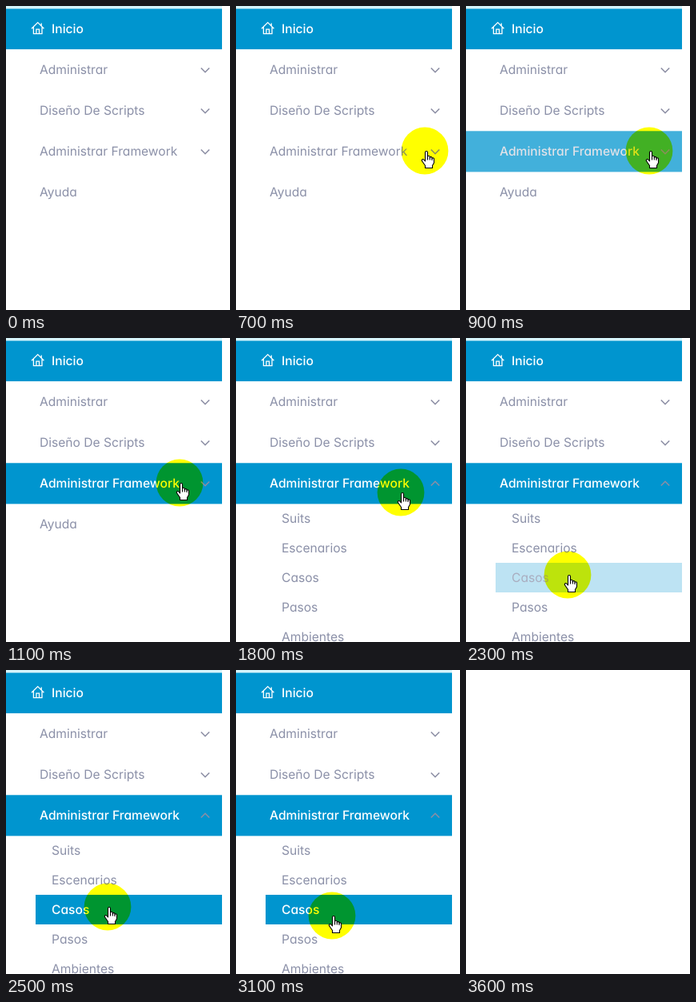
Animation, 280 px wide and 380 px high, one loop 3.7 s. Source, as an HTML page:

```html
<!DOCTYPE html>
<html lang="es">
<head>
<meta charset="utf-8">
<title>Menú lateral</title>
<style>
  html, body { margin: 0; width: 100%; height: 100%; overflow: hidden; background: #fff; }
  svg { display: block; }
  text {
    font-family: Inter, "Open Sans", sans-serif;
    font-size: 15.6px;
    font-feature-settings: "cv11";
    text-rendering: geometricPrecision;
  }
  .line { fill: none; stroke: #8c8ea4; stroke-width: 1.6; }
  /* Inverting the blue channel turns white to yellow and the menu blue to green. */
  .spot { fill: #00f; mix-blend-mode: difference; }
</style>
</head>
<body>
<script>
const LOOP = 3700, STEP = 100, END = 3600, POINTER_IN = 700;
const WIDTH = 270, STRIP = 3.5, MENU_TOP = 3, MENU_ROW = 51.1, SUB_ROW = 37, SUB_TOP = 207;
const BLUE = "rgb(0,149,207)", GREY = [139, 144, 168];

function el(parent, tag, attrs = {}, content = "") {
  const node = document.createElementNS("http://www.w3.org/2000/svg", tag);
  for (const key in attrs) node.setAttribute(key, attrs[key]);
  node.textContent = content;
  return parent.appendChild(node);
}

// Smooth rise from 0 to 1 between two times.
function ramp(t, from, to) {
  const p = Math.min(1, Math.max(0, (t - from) / (to - from)));
  return p * p * (3 - 2 * p);
}

function makeRow(parent, x, y, height, textX, label) {
  const back = el(parent, "rect", { x, y, width: WIDTH - x, height, fill: BLUE });
  const text = el(parent, "text", { x: textX, y: Math.round(y + height / 2 + 5.2) }, label);
  const row = { back, text };
  tint(row, 0);
  return row;
}

function tint({ back, text }, p) {
  back.setAttribute("opacity", p);
  text.style.fill = `rgb(${GREY.map(v => Math.round(v + (255 - v) * p))})`;
  text.style.fontWeight = p > .5 ? 500 : 400;
}

const stage = el(document.body, "svg", { width: 280, height: 380, viewBox: "0 0 280 380" });
el(stage, "rect", { width: 280, height: 380, fill: "#fff" });
const scene = el(stage, "g");
// The white base lies in the same group as the blended spot.
el(scene, "rect", { width: 280, height: 380, fill: "#fff" });

const menuRow = (parent, n, x, label) => makeRow(parent, 0, MENU_TOP + n * MENU_ROW, MENU_ROW, x, label);

tint(menuRow(scene, 0, 57, "Inicio"), 1);
el(scene, "rect", { width: WIDTH, height: STRIP, fill: "#d6f4fb" });
el(scene, "path", {
  class: "line", style: "stroke:#fff;stroke-width:1.3",
  d: "M32 28.3L39.7 20.6L47.4 28.3M34.4 26.5V34.6H45V26.5M37.9 34.6V29.2H41.5V34.6M44.2 24.5V21.5"
});

const groups = ["Administrar", "Diseño De Scripts", "Administrar Framework"].map((label, i) => {
  const row = menuRow(scene, i + 1, 42, label);
  const y = 80 + i * 51;
  const arrow = el(scene, "path", { class: "line", d: "M-5.2-2.5L0 2.7L5.2-2.5" });
  row.turn = angle => arrow.setAttribute("transform", `translate(249 ${y}) rotate(${angle})`);
  row.turn(0);
  return row;
});
const framework = groups[2];

const help = el(scene, "g");
menuRow(help, 4, 42, "Ayuda");

const submenu = el(scene, "svg", { y: SUB_TOP, width: WIDTH, height: 0, overflow: "hidden" });
const subRows = ["Suits", "Escenarios", "Casos", "Pasos", "Ambientes"]
  .map((label, i) => makeRow(submenu, 37, i * SUB_ROW, SUB_ROW, 57, label));
const [, scenarios, cases] = subRows;

const pointer = el(scene, "g");
const spot = el(scene, "circle", { class: "spot", r: 29.4 });
const hand = el(scene, "g", { stroke: "#000", "stroke-width": 1.1, fill: "#fff", "stroke-linejoin": "round" });
el(hand, "path", {
  d: "M5.5 13V2a1.5 1.5 0 0 1 3 0v5.5a1.4 1.4 0 0 1 2.8.3v.7a1.4 1.4 0 0 1 2.7.5v.8" +
     "a1.3 1.3 0 0 1 2.5.8V15l-2 3.5v3h-9v-3L1.7 13a1.4 1.4 0 0 1 2-2z"
});
el(hand, "path", { d: "M8.5 7.5v4M11.3 8v3.5M14 9.5v2.5" });

function draw(t) {
  scene.style.display = t < END ? "" : "none";

  const open = ramp(t, 1200, 1500);
  const height = open * SUB_ROW * subRows.length;
  submenu.setAttribute("height", height);
  help.setAttribute("transform", `translate(0 ${height})`);
  framework.turn(-180 * open);

  tint(framework, ramp(t, 700, 1000));
  tint(scenarios, t >= 2100 && t < 2200 ? .11 : 0);
  tint(cases, ramp(t, 2200, 2500));

  // Approach the group, go down to the entry, then drift.
  const near = ramp(t, 700, 1200), down = ramp(t, 1700, 2200), drift = ramp(t, 2500, 3300);
  const x = Math.round(236 - 21 * near - 88 * down - 8 * drift);
  const y = Math.round(181 + 115 * down + 13 * drift);
  spot.style.display = hand.style.display = t >= POINTER_IN ? "" : "none";
  spot.setAttribute("cx", x);
  spot.setAttribute("cy", y);
  hand.setAttribute("transform", `translate(${x - 5} ${y})`);
}

// The picture advances in steps of 100 ms.
const start = performance.now();
function tick() {
  const t = (performance.now() - start) % LOOP;
  draw(Math.floor(t / STEP) * STEP);
  requestAnimationFrame(tick);
}
tick();
</script>
</body>
</html>
```
